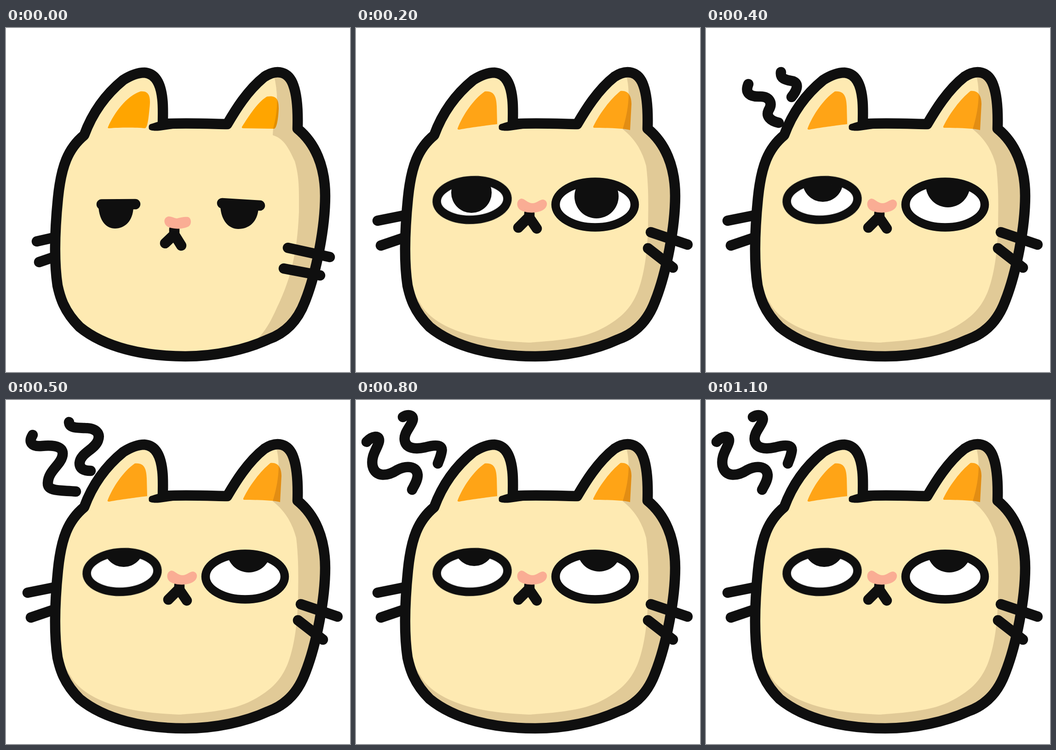
Recreate the animation shown at these times as an HTML page. Size 748 by 748 pixels, loop 1.3 s.

```html
<!DOCTYPE html>
<html lang="en">
<head>
<meta charset="utf-8">
<title>Unimpressed cat</title>
<style>
html, body { margin: 0; width: 100%; height: 100%; overflow: hidden; background: #fff; }
svg { display: block; width: 100vw; height: 100vh; }

.fur { fill: #feeab2; }
.ear { fill: #ffa500; }
.bored .ear { fill: #ffa416; }
.shade { fill: #e2dcd8; mix-blend-mode: multiply; }
.nose { fill: #faad94; }
.ink { fill: #0f0f0f; }
.line { fill: none; stroke: #0f0f0f; stroke-width: 22.5; stroke-linecap: round; stroke-linejoin: round; }
.eye { fill: none; stroke: #0f0f0f; stroke-width: 18.5; }

/* One step of 100 ms is 7.6923% of the loop. */
.anim { opacity: 0; animation: 1300ms step-end infinite; }
.rest { animation-name: rest; }
.squash { animation-name: squash; }
.bored { animation-name: bored; }
.puff1 { animation-name: puff1; }
.puff2 { animation-name: puff2; }
.wave1 { animation-name: wave1; }
.wave2 { animation-name: wave2; }
.pupil { animation: roll 1300ms step-end infinite; }

@keyframes rest { 0% { opacity: 1 } 7.6923%, 100% { opacity: 0 } }
@keyframes squash { 0% { opacity: 0 } 7.6923% { opacity: 1 } 15.3846%, 100% { opacity: 0 } }
@keyframes bored { 0% { opacity: 0 } 15.3846%, 100% { opacity: 1 } }
@keyframes puff1 { 0% { opacity: 0 } 23.0769% { opacity: 1 } 30.7692%, 100% { opacity: 0 } }
@keyframes puff2 { 0% { opacity: 0 } 30.7692% { opacity: 1 } 38.4615%, 100% { opacity: 0 } }
@keyframes wave1 {
  0% { opacity: 0 } 38.4615% { opacity: 1 } 53.8462% { opacity: 0 }
  69.2308% { opacity: 1 } 84.6154%, 100% { opacity: 0 }
}
@keyframes wave2 {
  0% { opacity: 0 } 53.8462% { opacity: 1 } 69.2308% { opacity: 0 }
  84.6154%, 100% { opacity: 1 }
}
@keyframes roll {
  0% { transform: translate(0, 8px) }
  23.0769% { transform: none }
  30.7692% { transform: translate(3px, -16px) }
  38.4615% { transform: translate(5px, -31px) }
  53.8462% { transform: translate(6px, -33px) }
  69.2308% { transform: translate(6px, -30px) }
  84.6154%, 100% { transform: translate(6px, -31px) }
}
</style>
</head>
<body>
<svg viewBox="0 0 748 748">
  <defs>
    <path id="head" d="M170 233C185 192 212 148 255 113C271 103 286 97 301 97C327 99 337 125 340 155C342 172 341 190 341 209
      C375 206 430 208 481 209C498 180 525 135 562 106C590 88 615 95 625 125C634 150 635 185 634 219
      C672 250 694 300 694 365C694 430 676 530 650 595C633 640 604 665 570 677C520 700 455 714 390 714
      C300 714 215 695 160 650C125 615 117 583 112 560C103 500 107 430 113 370C120 300 135 262 170 233Z"/>
    <path id="low" d="M181 264C196 228 220 195 250 172C270 158 288 149 305 147C328 150 340 180 340 215L339 251
      C380 249 430 248 474 253C500 215 530 172 565 149C598 140 612 160 620 185C626 205 627 235 625 263
      C660 292 680 335 680 395C680 450 676 530 655 588C632 640 595 670 565 685C520 706 455 715 385 715
      C300 715 220 700 168 655C125 615 117 560 115 500C114 450 117 400 122 360C128 325 145 285 181 264Z"/>
    <clipPath id="inHead"><use href="#head"/></clipPath>
    <clipPath id="inLow"><use href="#low"/></clipPath>
    <clipPath id="inLeft"><ellipse cx="252.5" cy="374" rx="77" ry="43" transform="rotate(-3 252.5 374)"/></clipPath>
    <clipPath id="inRight"><ellipse cx="520" cy="384" rx="86" ry="50"/></clipPath>
    <g id="outline">
      <use href="#head" class="line"/>
      <path class="ink" d="M314 209C330 204 345 199 370 198V218L335 223C325 224 315 224 311 220C310 215 310 211 314 209Z"/>
    </g>
    <g id="snout">
      <path class="line" d="M346 468L366 449L381 473M366 438V452"/>
      <path class="nose" d="M352 410C360 409 365 414 372 414C380 412 388 410 396 411C404 414 404 428 396 432C385 437 370 438 356 434C343 430 340 414 352 410Z"/>
    </g>
  </defs>

  <g class="anim rest">
    <path class="line" d="M67 464L107 455M72 509L107 497"/>
    <use href="#head" class="fur"/>
    <path class="ear" d="M222 215C235 185 262 148 292 138C312 136 315 150 312 175C310 195 308 217 302 218C285 216 245 216 225 218Q220 218 222 215Z"/>
    <path class="ear" d="M513 215C530 188 550 158 568 149C588 146 593 155 593 175C592 200 588 219 583 219L516 218Q512 218 513 215Z"/>
    <path class="shade" clip-path="url(#inHead)" d="M582 100C592 140 592 180 581 218L580 233C602 240 612 255 628 290C638 325 637 350 637 400C634 470 625 535 590 606C575 640 562 664 536 686V748H748V90Z"/>
    <use href="#outline"/>
    <path class="line" d="M613 478L704 498M604 523L683 538M208 383.500L281 383M470 381L552 386"/>
    <path class="ink" d="M201 388C203 420 218 436 237 436C258 436 276 420 277 390Z"/>
    <path class="ink" d="M466 388C468 420 485 437 505 437C528 437 547 422 549 392Z"/>
    <use href="#snout"/>
  </g>

  <g class="anim squash">
    <path class="line" d="M62 464L112 457M72 504L112 493"/>
    <use href="#low" class="fur"/>
    <path class="ear" d="M231 257C240 235 260 200 285 190C303 188 308 203 309 220L308 256Q307 261 302 261C285 259 255 260 234 260Q230 260 231 257Z"/>
    <path class="ear" d="M509 263C525 235 550 200 575 187C595 185 600 200 599 215L596 262Q595 265 591 265C570 263 530 263 509 264Z"/>
    <path class="shade" clip-path="url(#inLow)" d="M587 145C597 180 592 220 578 265C610 290 634 335 635 375C637 440 625 525 605 580C590 615 565 660 522 694V748H748V140Z"/>
    <use href="#low" class="line"/>
    <path class="line" d="M329 256L345 252M473 254L462 252M181 264L180 260M624 263L625 258"/>
    <path class="line" d="M614 478L703 494M611 522L687 537M203 419L277 415M457 425L533 430"/>
    <use href="#snout" transform="translate(-6.500 32)"/>
  </g>

  <g class="anim bored">
    <path class="line anim puff1" d="M143 179C141 200 148 215 165 225M187 152C185 165 188 175 196 184"/>
    <path class="line anim puff2" d="M92 122C84 142 96 150 118 149C138 149 146 163 136 179C130 192 140 202 158 206M163 96C161 112 176 113 190 116C204 122 196 138 186 150"/>
    <path class="line anim wave1" d="M58 76C48 92 56 102 78 100C112 97 128 104 122 124C117 142 92 155 91 180C90 200 120 196 152 199
      M137 48C138 62 155 60 172 61C195 61 206 72 200 88C193 108 162 115 160 137C160 150 170 154 184 154"/>
    <path class="line anim wave2" d="M23 91C35 78 52 75 50 90C47 105 32 120 36 143C42 170 70 165 90 152C110 142 132 143 134 163C134 175 127 185 122 195
      M102 37C112 30 127 32 123 45C119 58 103 72 106 88C109 105 128 108 150 103C175 96 190 98 186 113C184 124 180 132 178 138"/>
    <path class="line" d="M47 419L107 407M54 473L107 455"/>
    <use href="#head" class="fur"/>
    <path class="ear" d="M221 218C232 190 255 155 280 138C300 136 305 148 306 170L307 209C290 211 245 217 224 221Q220 221 221 218Z"/>
    <path class="ear" d="M516 214C530 185 553 155 575 137C592 135 599 148 599 165L596 222C580 218 540 217 518 217Q515 217 516 214Z"/>
    <path class="shade" clip-path="url(#inHead)" d="M587 100C598 140 592 180 580 220C605 240 622 265 631 300C636 340 636 380 635 430C634 480 628 535 612 575C602 598 592 612 575 627C545 652 510 668 470 674C440 680 400 682 380 684C345 683 290 679 250 668C200 655 165 634 146 609L128 580L60 640V748H748V90Z"/>
    <use href="#outline"/>
    <path class="line" d="M641 444L721 471M635 479L689 521"/>

    <g clip-path="url(#inLeft)">
      <rect x="160" y="320" width="185" height="110" fill="#fff"/>
      <circle class="ink pupil" cx="251" cy="350" r="44"/>
    </g>
    <ellipse class="eye" cx="252.500" cy="374" rx="77" ry="43" transform="rotate(-3 252.500 374)"/>
    <g clip-path="url(#inRight)">
      <rect x="420" y="320" width="200" height="130" fill="#fff"/>
      <circle class="ink pupil" cx="523" cy="358" r="48"/>
    </g>
    <ellipse class="eye" cx="520" cy="384" rx="86" ry="49.500"/>

    <path class="line" d="M353 434L376 411L393 436M377 403V413"/>
    <path class="nose" d="M359 371C366 370 373 381 384 381C393 381 399 373 407 373C417 375 418 387 409 394C398 403 372 404 358 396C348 390 348 374 359 371Z"/>
  </g>
</svg>
</body>
</html>
```
